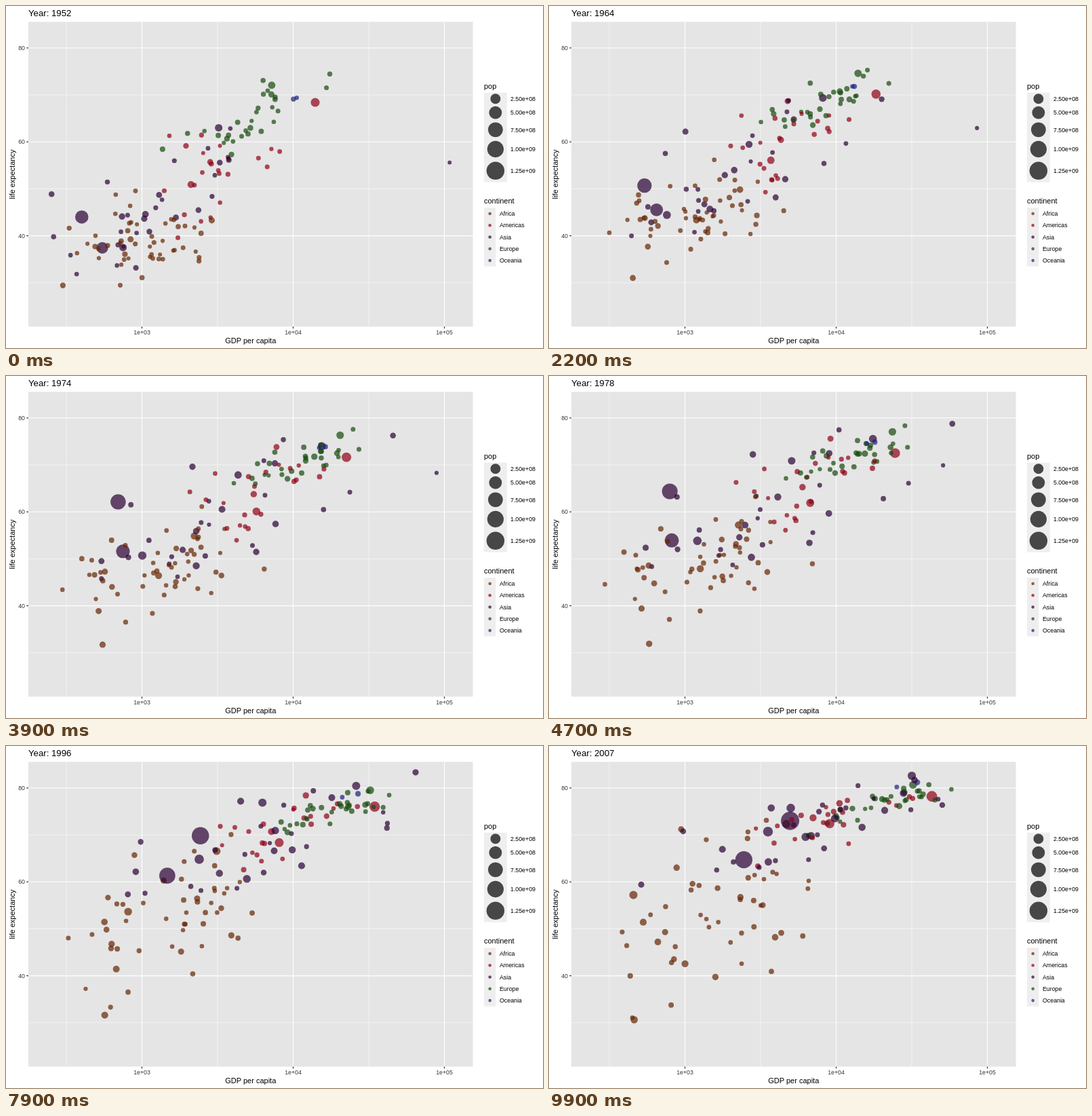
An HTML page for the animation above (10 s loop, 792x504 px).

```html
<!DOCTYPE html>
<html lang="en">
<head>
<meta charset="utf-8">
<title>Life expectancy and GDP</title>
<style>
html, body { margin: 0; width: 100%; height: 100%; overflow: hidden; background: #fff; }
svg { display: block; font-family: "Liberation Sans", Arial, sans-serif; }
</style>
</head>
<body>
<svg id="stage" width="792" height="504"></svg>
<script>
const stage = document.getElementById('stage');
const COLORS = { Africa: '#662503', Americas: '#900015', Asia: '#290033', Europe: '#154A0C', Oceania: '#1D217E' };
const ALPHA = 0.7, FRAMES = 100, FRAME_MS = 100, FIRST = 1952, LAST = 2007;

const px = logGdp => 200.5 + (logGdp - 3) * 223;
const py = life => 61.8 + (80 - life) * 6.92;
const radius = millions => 2.84 + 10.67 * Math.sqrt(millions / 1319);

function draw(tag, attrs, text) {
  const el = document.createElementNS('http://www.w3.org/2000/svg', tag);
  for (const key in attrs) el.setAttribute(key, attrs[key]);
  if (text) el.textContent = text;
  return stage.appendChild(el);
}
const rect = (x, y, width, height, fill) => draw('rect', { x, y, width, height, fill });
const line = (x1, y1, x2, y2, stroke, w) => draw('line', { x1, y1, x2, y2, stroke, 'stroke-width': w });
const dot = (cx, cy, r, fill) => draw('circle', { cx, cy, r, fill, 'fill-opacity': ALPHA });
const label = (x, y, size, text, fill = '#000', anchor = 'start') =>
  draw('text', { x, y, 'font-size': size, fill, 'text-anchor': anchor }, text);

// Panel, grid and axes
const L = 33, T = 23.4, R = 688.6, B = 472.5;
rect(L, T, R - L, B - T, '#E5E5E5');
for (const v of [30, 50, 70]) line(L, py(v), R, py(v), '#fff', 0.55);
for (const v of [2.5, 3.5, 4.5]) line(px(v), T, px(v), B, '#fff', 0.55);
for (const v of [40, 60, 80]) {
  line(L, py(v), R, py(v), '#fff', 1.1);
  line(L - 2.8, py(v), L, py(v), '#1F1F1F', 1.1);
  label(28, py(v) + 3.2, 8.8, v, '#353535', 'end');
}
for (const v of [3, 4, 5]) {
  line(px(v), T, px(v), B, '#fff', 1.1);
  line(px(v), B, px(v), B + 2.8, '#1F1F1F', 1.1);
  label(px(v), 484.3, 8.8, '1e+0' + v, '#353535', 'middle');
}
label(360.8, 497, 11, 'GDP per capita', '#000', 'middle');
label(0, 0, 11, 'life expectancy', '#000', 'middle').setAttribute('transform', 'translate(13 248) rotate(-90)');
const title = label(33, 15, 13.2, 'Year: ' + FIRST);

// Legends
label(705, 122, 11, 'pop');
rect(705, 127.7, 33.8, 131.9, '#EEE');
[['2.50e+08', 136.7], ['5.00e+08', 157.2], ['7.50e+08', 182.3], ['1.00e+09', 211], ['1.25e+09', 242.8]]
  .forEach(([text, y]) => {
    dot(721.9, y, radius(text / 1e6), '#000');
    label(744, y + 3.2, 8.8, text);
  });
label(705, 291, 11, 'continent');
rect(705, 297.3, 17.3, 86.4, '#EEE');
Object.keys(COLORS).forEach((name, i) => {
  const y = 306 + i * 17.28;
  dot(713.7, y, 2.3, COLORS[name]);
  label(728, y + 3.2, 8.8, name);
});

let seed = 1952;
function random() {
  seed = seed + 0x6D2B79F5 | 0;
  let t = Math.imul(seed ^ seed >>> 15, 1 | seed);
  t = t + Math.imul(t ^ t >>> 7, 61 | t) ^ t;
  return ((t ^ t >>> 14) >>> 0) / 4294967296;
}
const noise = () => (random() + random() + random() - 1.5) * 2;
const drift = base => 0.85 * base + 0.5 * noise();
const capLife = life => 83 - 3 * Math.log(1 + Math.exp((83 - life) / 3));

const countries = [];
function add(continent, popFrom, popTo, at) {
  countries.push({ continent, at, r0: radius(popFrom), r1: radius(popTo), order: random() });
}

// Parabola through the values of three epochs
const EPOCHS = [1952, 1977, 2007];
const curve = (values, year) => values.reduce((sum, v, i) =>
  sum + EPOCHS.reduce((w, e, j) => j === i ? w : w * (year - e) / (EPOCHS[i] - e), v), 0);

// Per epoch: mean and spread of log GDP, mean and spread of life expectancy, their correlation
function crowd(continent, count, pop, growth, epochs) {
  for (let i = 0; i < count; i++) {
    const rank = 3.2 * ((i + 0.5) / count - 0.5), health = noise();
    const gdp = [], life = [];
    for (const [meanGdp, sdGdp, meanLife, sdLife, link] of epochs) {
      const wealth = drift(rank);
      gdp.push(meanGdp + sdGdp * wealth);
      life.push(capLife(meanLife + sdLife * (link * wealth + Math.sqrt(1 - link * link) * drift(health))));
    }
    const size = pop * Math.exp(1.1 * noise());
    add(continent, size, size * growth, year => [curve(gdp, year), curve(life, year)]);
  }
}

// Straight segments through [year, GDP, life expectancy]
function follow(continent, popFrom, popTo, points) {
  add(continent, popFrom, popTo, year => {
    const i = Math.max(1, points.findIndex(p => p[0] >= year));
    const [y0, g0, l0] = points[i - 1], [y1, g1, l1] = points[i];
    const k = (year - y0) / (y1 - y0);
    return [Math.log10(g0) + Math.log10(g1 / g0) * k, l0 + (l1 - l0) * k];
  });
}

crowd('Africa', 51, 2.8, 3.6, [[2.98, .29, 39.1, 5, .25], [3.14, .36, 49.6, 6, .5], [3.2, .42, 55, 9.3, .5]]);
crowd('Americas', 23, 3.5, 2.4, [[3.47, .24, 53.3, 9, .5], [3.77, .22, 64.8, 6.5, .6], [3.93, .3, 73.6, 4, .6]]);
crowd('Asia', 28, 7, 2.8, [[3.13, .36, 46.3, 9, .6], [3.52, .5, 59.6, 9, .7], [3.72, .54, 70.7, 7, .8]]);
crowd('Europe', 30, 8, 1.25, [[3.7, .26, 64.8, 5.5, .8], [4.1, .2, 71.9, 2.8, .7], [4.36, .24, 77.8, 2.9, .85]]);

// Large or far-off countries: China, India, Indonesia, Japan, Kuwait, USA, Brazil, Rwanda, Australia, New Zealand
follow('Asia', 556, 1319, [[1952, 400, 44], [1957, 576, 50.5], [1962, 488, 44.5], [1967, 613, 58.4],
  [1977, 741, 64], [1987, 1379, 67.3], [2007, 4959, 73]]);
follow('Asia', 372, 1110, [[1952, 547, 37.4], [1972, 724, 50.7], [1987, 977, 58.6], [2007, 2452, 64.7]]);
follow('Asia', 82, 224, [[1952, 750, 37.5], [1967, 762, 46], [1987, 1748, 60.1], [2007, 3541, 70.7]]);
follow('Asia', 86, 127, [[1952, 3217, 63], [1972, 14779, 73.4], [1987, 22376, 78.7], [2007, 31656, 82.6]]);
follow('Asia', 0.2, 2.5, [[1952, 108382, 55.6], [1967, 80895, 64.6], [1972, 109348, 67.7], [1982, 31354, 71.3], [2007, 47307, 77.6]]);
follow('Americas', 158, 301, [[1952, 13990, 68.4], [1972, 21806, 71.3], [2007, 42952, 78.2]]);
follow('Americas', 57, 190, [[1952, 2109, 50.9], [1977, 6660, 61.5], [2007, 9066, 72.4]]);
follow('Africa', 2.5, 8.9, [[1952, 493, 40], [1987, 848, 44], [1992, 737, 23.6], [1997, 590, 36.1], [2007, 863, 46.2]]);
follow('Oceania', 8.7, 20, [[1952, 10040, 69.1], [2007, 34435, 81.2]]);
follow('Oceania', 2, 4.1, [[1952, 10557, 69.4], [2007, 25185, 80.2]]);

countries.sort((a, b) => a.order - b.order);
for (const c of countries) c.el = dot(0, 0, c.r0, COLORS[c.continent]);

function show(frame) {
  const part = frame / (FRAMES - 1);
  const year = FIRST + (LAST - FIRST) * part;
  title.textContent = 'Year: ' + Math.round(year);
  for (const c of countries) {
    const [gdp, life] = c.at(year);
    c.el.setAttribute('cx', px(gdp).toFixed(2));
    c.el.setAttribute('cy', py(life).toFixed(2));
    c.el.setAttribute('r', (c.r0 + (c.r1 - c.r0) * part).toFixed(2));
  }
}

const start = performance.now();
let shown = 0;
show(0);
function tick() {
  const frame = Math.floor(Math.max(0, performance.now() - start) / FRAME_MS) % FRAMES;
  if (frame !== shown) show(shown = frame);
  requestAnimationFrame(tick);
}
requestAnimationFrame(tick);
</script>
</body>
</html>
```
